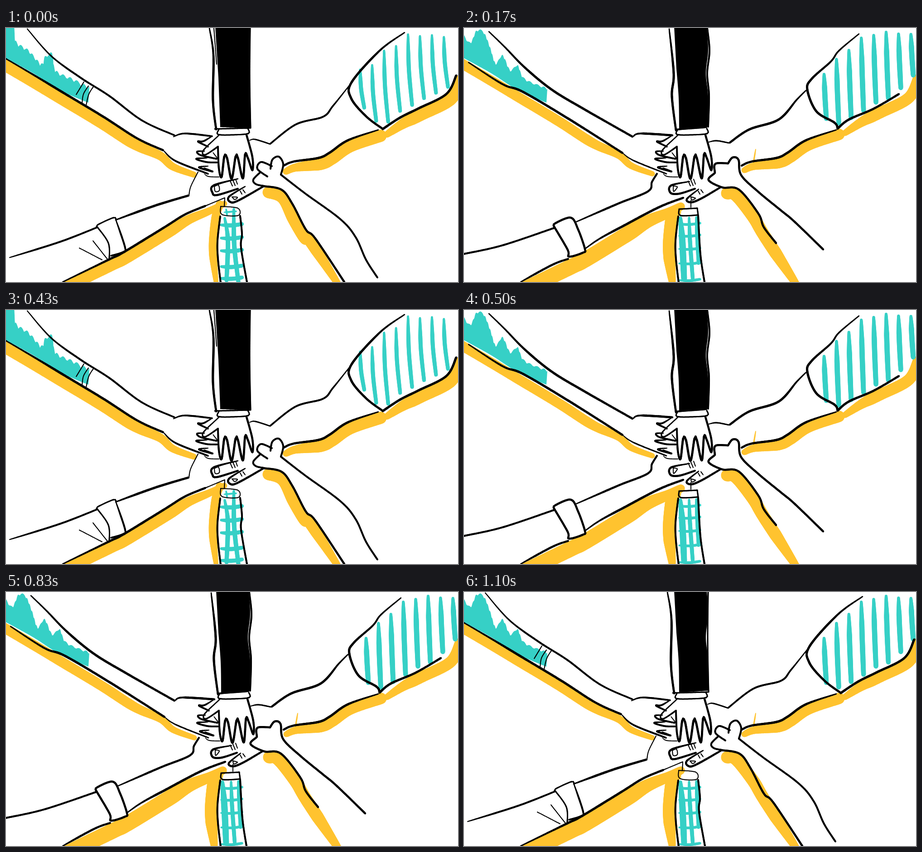
Animation of 998x561 px, one loop 1170 ms. Source, as an HTML page with a canvas:

```html
<!DOCTYPE html>
<html lang="en">
<head>
<meta charset="utf-8">
<title>Hands together</title>
<style>
html, body { margin: 0; width: 100%; height: 100%; overflow: hidden; background: #fff; }
canvas { display: block; }
</style>
</head>
<body>
<canvas id="stage" width="998" height="561"></canvas>
<script>
const ctx = document.getElementById('stage').getContext('2d');
const ORANGE = '#ffc32f', TEAL = '#36d0c6', BLACK = '#000';
const TAPER = [.5, 1, 1, .9], EVEN = [1, 1], FADE = [1, 1, 1, .5];
ctx.lineCap = ctx.lineJoin = 'round';

// Smooth curve through "x y x y ..."; a repeated point makes a sharp corner.
function spline(text) {
  const n = text.split(' ').map(Number), p = [];
  while (n.length) p.push(n.splice(0, 2));
  const out = [p[0]];
  for (let i = 0; i < p.length - 1; i++) {
    const a = p[i - 1] || p[i], b = p[i], c = p[i + 1], d = p[i + 2] || c;
    const length = Math.hypot(c[0] - b[0], c[1] - b[1]);
    if (!length) continue;
    const steps = Math.ceil(length / 3);
    for (let s = 1; s <= steps; s++) {
      const t = s / steps;
      out.push([0, 1].map(k => b[k] + t / 2 * (c[k] - a[k] +
        t * (2 * a[k] - 5 * b[k] + 4 * c[k] - d[k] +
        t * (3 * (b[k] - c[k]) + d[k] - a[k])))));
    }
  }
  return out;
}

function brush(color, width, text, profile) {
  const p = spline(text), spans = profile.length - 1;
  ctx.strokeStyle = color;
  for (let i = 1; i < p.length; i++) {
    const u = i / p.length * spans, k = Math.floor(u);
    ctx.lineWidth = width * (profile[k] + (profile[k + 1] - profile[k]) * (u - k));
    ctx.beginPath();
    ctx.moveTo(...p[i - 1]);
    ctx.lineTo(...p[i]);
    ctx.stroke();
  }
}

function blob(color, pts) {
  ctx.fillStyle = color;
  ctx.beginPath();
  pts.forEach(p => ctx.lineTo(...p));
  ctx.fill();
}

function shifted(dx, dy, draw) {
  ctx.save();
  ctx.translate(dx, dy);
  draw();
  ctx.restore();
}

const ink = (width, ...paths) => paths.forEach(p => brush(BLACK, width, p, TAPER));
const line = (width, ...paths) => paths.forEach(p => brush(BLACK, width, p, EVEN));
const paint = (width, ...paths) => paths.forEach(p => brush(TEAL, width, p, TAPER));
const shadow = (dx, dy, width, path) =>
  shifted(dx, dy, () => brush(ORANGE, width, path, FADE));

// Edges that carry both an outline and a shadow
const LEFT_ARM = '-5 65 60 103 125 142 215 196 290 244 347 270';
const SLEEVE_EDGE = '994 105 972 146 910 178 870 198 832 223';
const RIGHT_ARM = '822 225 755 248 715 275 690 287 635 295 613 304';
const LOW_LEFT_ARM = '125 561 228 511 260 495 350 440 395 412 440 393';
const LOW_RIGHT = '566 349 608 357 632 388 662 445 683 465 747 561';
const LOW_RIGHT_ROUGH = '553 321 540 336 570 352 607 357 650 410 662 440 689 475';
const PLAID_LEFT = '473 416 467 470 468 510 474 563';

function scribble(edge, bump) {
  const top = spline(edge).map(([x, y], i) => [x, y - bump * Math.abs(Math.sin(i * .6))]);
  blob(TEAL, [...top, ...spline('182 165 120 138 60 100 -5 64')]);
}

function stripes(x, gap, lean, width, tops, bottoms) {
  const ends = bottoms.split(' ').map(Number);
  tops.split(' ').map(Number).forEach((top, i) => {
    const left = x + gap * i;
    paint(width, `${left} ${top} ${left + 2} ${(top + ends[i]) / 2} ${left + lean} ${ends[i]}`);
  });
}

const weave = (width, ...rows) =>
  rows.forEach(y => paint(width, `475 ${y} 498 ${y + 1} 521 ${y - 2}`));

function colorSmooth() {
  shadow(-7, 12, 25, LEFT_ARM + ' 375 294 422 312');
  shadow(9, 12, 27, SLEEVE_EDGE);
  shadow(5, 13, 27, RIGHT_ARM);
  shadow(7, 12, 25, LOW_LEFT_ARM + ' 475 376');
  shadow(-10, 0, 18, '482 390 ' + PLAID_LEFT);
  shadow(-11, 7, 25, '590 356 622 369 645 415 670 457 683 465 747 563');
  scribble('-3 0 17 4 22 36 50 56 78 86 86 70 102 63 110 100 150 120 184 138', 8);
  stripes(782, 26.4, 9, 9, '92 82 50 40 14 18 16 20', '176 205 207 183 170 155 143 130');
  paint(10, '483 420 490 470 487 557', '503 400 504 480 513 560');
  weave(9, 435, 464, 492, 527, 553);
  paint(4, '482 407 508 405', '486 400 488 413');
  blob(BLACK, spline('462 -3 462 -3 540 -3 540 -3 538 110 540 221 540 221 473 219 473 219 469 110'));
  line(2, '459 0 465 80');
}

function colorRough() {
  shadow(-6, 10, 22, LEFT_ARM + ' 375 294 422 312');
  shadow(9, 9, 25, SLEEVE_EDGE);
  shadow(6, 10, 25, RIGHT_ARM);
  shadow(9, 16, 34, LOW_LEFT_ARM + ' 470 378');
  shadow(-14, 0, 27, '480 405 ' + PLAID_LEFT);
  shadow(-11, 8, 27, '592 357 612 362 650 410 675 452 748 563');
  brush(ORANGE, 3, '644 268 637 310', TAPER);
  scribble('-3 16 14 36 28 9 44 14 58 48 70 82 85 64 102 97 118 86 134 116 184 137', 5);
  stripes(795, 27.4, 5, 11.5, '102 69 49 22 16 9 13 14', '200 210 198 182 164 155 132 104');
  paint(14, '478 420 482 470 486 554');
  paint(9, '497 419 499 470 505 553', '513 418 518 519');
  weave(6, 433, 459, 488, 520, 557);
  blob(BLACK, spline('464 -3 464 -3 536 -3 536 -3 539 50 534 100 539 150 539 218 539 218 475 222 475 222 474 155 469 90'));
}

// Parts both drawings have in common
function hands(dx) {
  shifted(dx, 0, () => {
    ink(4, '455 239 436 250 424 251 446 262',
      '438 272 422 273 430 281 465 289',
      '444 287 420 289 442 296 466 297',
      '446 305 426 308 456 317 438 310');
    ink(2, '438 322 447 328 470 329', '457 275 467 288');
    line(3, '470 224 468 235 500 236 535 233 534 222');
    ink(4.8, '470 237 436 270 440 280 468 262 468 262 470 310 476 329 482 284 488 287 498 333 507 284 512 287 523 332 528 279 534 287 544 314 544 285 531 236');
  });
  line(2, '495 338 500 349', '501 336 506 348', '507 334 511 345', '517 360 521 367', '523 357 528 364');
}

function linesSmooth() {
  hands(0);
  ink(4, '47 2 100 62 165 110 228 150 300 204 372 237', '370 240 395 233 455 239');
  ink(5, LEFT_ARM);
  ink(4, '349 272 375 294 446 322');
  line(2, '172 119 155 147', '182 128 171 146 168 166', '194 128 183 146 177 170');

  ink(5, '449 0 458 60 457 160 464 224');
  line(3, '539 0 538 110 540 221', '461 223 538 221');

  ink(4, '758 127 722 172 700 196 640 213 583 256');
  ink(3, '538 248 550 246 582 256');
  ink(5, '880 10 825 50 763 120 762 155 795 195 832 223', RIGHT_ARM);
  line(5, SLEEVE_EDGE);

  line(4, '577 328 555 311 563 296 587 305', '584 311 588 291 602 284 612 300 607 324',
    '562 318 546 335 552 345 570 349');
  line(4, '607 324 660 365 738 422 772 462 795 512 820 551');
  line(4.5, LOW_RIGHT);

  ink(4, '8 507 120 472 202 440', '242 422 263 485 258 495 232 503');
  line(3, '202 440 202 435 237 419 243 423', '202 440 226 475 228 511');
  ink(5, '242 424 330 392 403 370', LOW_LEFT_ARM);
  line(2, '404 369 408 350 424 318', '162 486 212 512', '192 470 225 512', '440 393 483 375');

  ink(4.5, '512 333 458 348 456 364 466 369 512 355', '528 350 492 373 497 385 515 380 568 350');
  line(2, '460 350 469 347 471 359 462 361 460 350', '499 373 511 374 505 379 499 373');

  line(2, '483 376 482 394', '474 394 512 398 513 414 477 412 474 394');
  line(4, PLAID_LEFT, '517 415 521 455 519 485 532 561');
}

function linesRough() {
  hands(2);
  ink(5, '55 8 90 42 135 88 195 137 270 182 372 240', '374 239 390 233 460 237', '10 76 85 124 130 141 230 200 350 276');
  ink(3, '350 276 375 293 447 322');

  ink(5, '453 2 463 100 459 150 468 226');
  line(4, '537 0 542 50 537 100 541 150 539 218', '471 224 535 219');

  ink(5, '755 138 735 158 695 202 630 224 587 253', RIGHT_ARM);
  ink(3, '540 252 558 249 585 254');
  ink(5, '872 13 828 50 810 74 768 112 758 136 778 184 818 209 825 222 825 222 850 202 905 178 960 146');

  line(4.5, '554 320 555 300 583 299 583 299 593 286 606 291 612 325 650 362 700 403 730 428 793 489',
    LOW_RIGHT_ROUGH);

  line(4, '0 499 85 480 198 442');
  line(4.5, '198 437 202 431 236 419 252 445 267 488 263 496 232 505 229 490 198 437');
  ink(4.5, '248 428 340 388 406 361 415 340 426 322', '125 561 195 523 230 510');
  ink(5, '268 487 300 465 352 437 430 396 484 375');

  ink(4.5, '498 339 457 348 456 364 475 366 510 355', '518 356 492 378 502 385 525 376 566 352');
  line(2, '462 349 471 351 463 361 462 349', '501 373 511 376 503 380 501 373', '501 381 501 396');

  line(3, '475 400 475 400 515 398 515 398 517 413 517 413 478 414 475 400');
  line(4, PLAID_LEFT, '517 414 522 500 531 561');
}

const SMOOTH = [colorSmooth, linesSmooth];
const ROUGH = [colorRough, linesRough];
const MIXED = [colorRough, linesSmooth];
const POSES = [SMOOTH, ROUGH, SMOOTH, ROUGH, SMOOTH, ROUGH, MIXED];
const ENDS = [170, 330, 500, 670, 830, 1000, 1170];

let shown;
function frame(now) {
  const time = now % 1170;
  const pose = POSES[ENDS.findIndex(end => time < end)];
  if (pose !== shown) {
    ctx.fillStyle = '#fff';
    ctx.fillRect(0, 0, 998, 561);
    pose.forEach(layer => layer());
    shown = pose;
  }
  requestAnimationFrame(frame);
}
frame(0);
</script>
</body>
</html>
```
